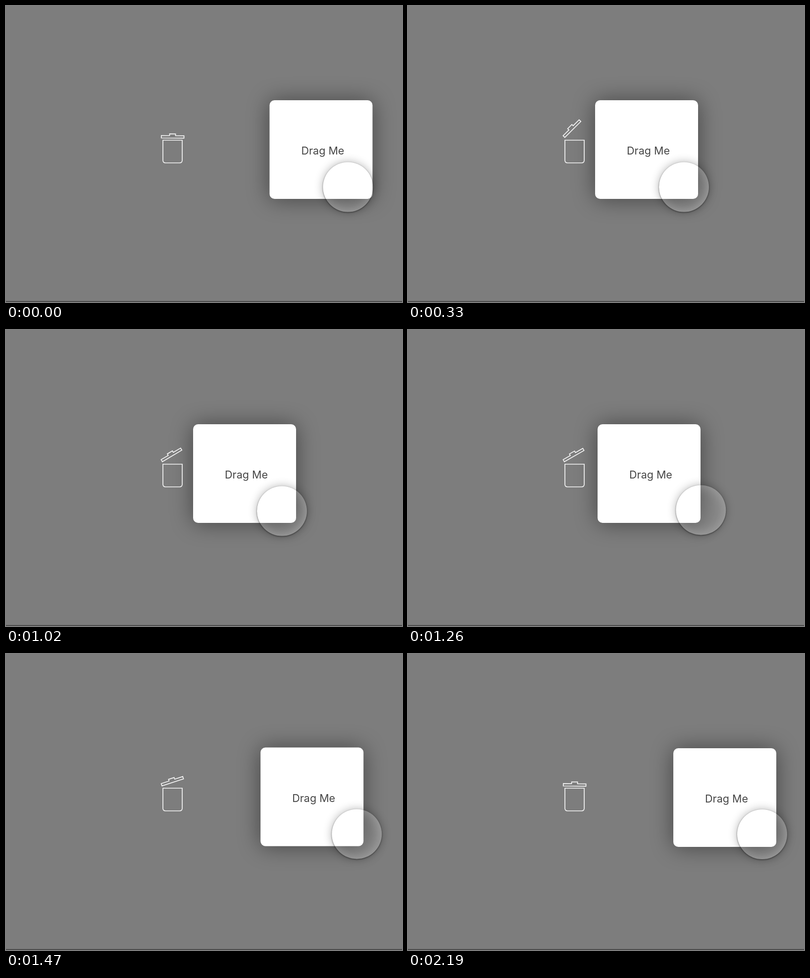
Recreate the animation shown at these times as an HTML page. Size 800x600 px, loop 2220 ms.

```html
<!DOCTYPE html>
<html lang="en">
<head>
<meta charset="utf-8">
<title>Drag to trash</title>
<style>
  html, body { margin: 0; width: 100%; height: 100%; overflow: hidden; background: #7d7d7d; }
  #stage { position: absolute; left: 0; top: 0; width: 800px; height: 600px; overflow: hidden; }
  #floor { position: absolute; left: 0; bottom: 0; width: 800px; height: 2px; background: #4c4c4c; }
  #card, #touch { position: absolute; left: 0; top: 0; }
  #card {
    width: 208px; height: 199.5px; border-radius: 10px; background: #fff;
    box-shadow: 0 1px 45px rgba(0, 0, 0, .45);
  }
  #card svg { position: absolute; left: 0; top: 0; }
  #card text { font: 400 21.5px Inter, Roboto, sans-serif; fill: #454545; text-anchor: middle; }
  #touch {
    width: 101px; height: 101px; border-radius: 50%;
    background: rgba(255, 255, 255, .08);
    box-shadow: 0 1px 3px rgba(0, 0, 0, .5), 0 0 18px rgba(0, 0, 0, .3),
      inset 0 0 25px rgba(255, 255, 255, .28);
  }
  #trash { position: absolute; left: 0; top: 0; fill: none; stroke: #f4f4f4; stroke-width: 1.7; }
</style>
</head>
<body>
<div id="stage">
  <div id="floor"></div>
  <div id="card">
    <svg width="208" height="199"><text x="107.5" y="110">Drag Me</text></svg>
  </div>
  <div id="touch"></div>
  <svg id="trash" width="800" height="600">
    <path d="M317 272H356V312.5Q356 318 350.5 318H322.5Q317 318 317 312.5Z"/>
    <path id="lid" d="M313.8 267.5V262.6H330.5V259H342.5V262.6H359.6V267.5Z"/>
  </svg>
</div>
<script>
  const LOOP = 2220, STEP = 30, TRAVEL = 158, OPEN = -30;
  const [card, touch, lid] = ['card', 'touch', 'lid'].map(id => document.getElementById(id));

  // Eased progress from 0 to 1
  const ease = (t, start, length) => {
    const p = Math.min(1, Math.max(0, (t - start) / length));
    return (1 - Math.cos(Math.PI * p)) / 2;
  };

  const bump = (t, peak, width) => Math.exp(-(((t - peak) / width) ** 2));

  // Damped spring from 0 to 1; each half swing is half as wide as the last
  const spring = (t, start, half) => {
    const s = t - start;
    if (s <= 0) return 0;
    const w = Math.PI / half, d = Math.LN2 / half;
    return 1 - Math.exp(-d * s) * (Math.cos(w * s) + d / w * Math.sin(w * s));
  };

  const place = (el, x, y) => { el.style.transform = `translate(${x}px, ${y}px)`; };

  function draw(t) {
    const back = ease(t, 1144, 376);
    const touchX = 715.5 + TRAVEL * (back - ease(t, -96, 371));
    const touchY = 367 - 1.5 * back - 4.2 * bump(t, 1345, 90);
    place(touch, touchX - 50.5, touchY - 50.5);

    const cardX = 536 + TRAVEL * (ease(t, 1223, 326) - ease(t, -31, 323));
    place(card, cardX, 191 - 3.6 * bump(t, 1410, 64));

    const close = time => spring(time, 1424, 150);
    const angle = OPEN * (spring(t, 161, 168) - close(t) + 1 - close(t + LOOP));
    lid.setAttribute('transform', `rotate(${angle} 314 263.4)`);
  }

  const begin = performance.now();
  function tick() {
    const t = (performance.now() - begin) % LOOP;
    draw(Math.floor(t / STEP) * STEP);
    requestAnimationFrame(tick);
  }
  tick();
</script>
</body>
</html>
```
